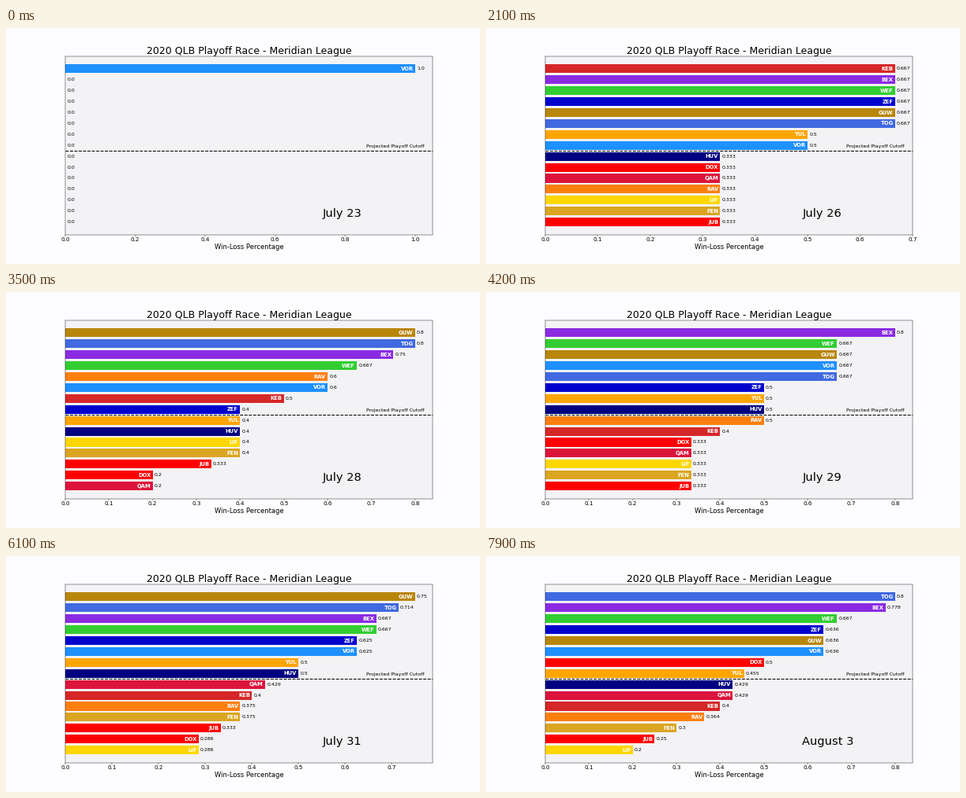
A matplotlib script that plays this animation: 600 px wide and 300 px high, repeating every 8 s.

```python
import matplotlib.pyplot as plt
from matplotlib.animation import FuncAnimation
from matplotlib.ticker import MultipleLocator

plt.rcParams["font.family"] = "DejaVu Sans"

FRAMES_PER_DAY = 7
FRAMES = 80

COLORS = {
    "VOR": "dodgerblue", "KEB": "tab:red", "GUW": "darkgoldenrod",
    "ZEF": "mediumblue", "HUV": "navy", "DOX": "red", "QAM": "crimson",
    "JUB": "red", "RAV": "tab:orange", "BEX": "blueviolet",
    "TOG": "royalblue", "WEF": "limegreen", "YUL": "orange",
    "LIF": "gold", "FEN": "goldenrod",
}

# Winners and losers of each day
RESULTS = [
    ("VOR", "YUL QAM"),
    ("RAV DOX WEF TOG KEB GUW VOR", "ZEF JUB HUV LIF FEN BEX YUL"),
    ("KEB GUW YUL ZEF HUV QAM JUB BEX", "VOR LIF FEN RAV DOX TOG WEF"),
    ("ZEF WEF TOG LIF BEX FEN YUL", "RAV DOX QAM JUB HUV KEB GUW VOR"),
    ("GUW TOG HUV RAV", "FEN DOX LIF ZEF QAM"),
    ("VOR BEX GUW TOG LIF FEN RAV", "YUL DOX HUV ZEF QAM KEB"),
    ("VOR BEX YUL DOX HUV ZEF QAM", "GUW TOG LIF FEN RAV KEB"),
    ("GUW VOR ZEF QAM", "YUL RAV FEN"),
    ("TOG GUW ZEF FEN YUL", "LIF BEX RAV VOR DOX"),
    ("TOG BEX ZEF VOR YUL", "LIF GUW RAV FEN"),
    ("TOG BEX ZEF VOR DOX DOX", "LIF GUW RAV FEN YUL"),
    ("TOG BEX RAV GUW DOX", "LIF YUL ZEF VOR HUV JUB"),
]

# Order of teams that are level, for the opening days and afterwards
OPENING = "VOR KEB GUW ZEF HUV DOX QAM JUB RAV BEX TOG WEF YUL LIF FEN".split()
LATER = "KEB BEX WEF ZEF GUW YUL HUV DOX QAM RAV VOR TOG LIF FEN JUB".split()


def build_standings():
    wins = dict.fromkeys(COLORS, 0)
    games = dict.fromkeys(COLORS, 0)
    table = []
    for day, (won, lost) in enumerate(RESULTS):
        for team in won.split():
            wins[team] += 1
            games[team] += 1
        for team in lost.split():
            games[team] += 1
        ties = OPENING if day < 3 else LATER
        pct = [(team, wins[team] / max(games[team], 1)) for team in ties]
        # sorted() is stable, so level teams keep the tie order
        table.append(sorted(pct, key=lambda row: -row[1]))
    return table


def date_text(day):
    number = 23 + day
    return f"July {number}" if number <= 31 else f"August {number - 31}"


STANDINGS = build_standings()

fig = plt.figure(figsize=(16, 8), dpi=37.5, facecolor="#fdfcfe")
ax = fig.add_axes([0.125, 0.125, 0.775, 0.755])


def draw(frame):
    day = frame // FRAMES_PER_DAY
    rows = STANDINGS[day]
    best = rows[0][1]
    gap = best / 200

    ax.clear()
    ax.set_facecolor("#f3f2f4")
    for i, (team, pct) in enumerate(rows):
        y = len(rows) - i
        ax.barh(y, pct, height=0.8, color=COLORS[team])
        if pct > 0:
            ax.text(pct - gap, y, team, size=13, weight="bold", color="white",
                    ha="right", va="center")
        ax.text(pct + gap, y, str(round(pct, 3)), size=12,
                ha="left", va="center")

    ax.axhline(7.5, color="black", lw=2, ls="--")
    ax.text(0.82, 0.49, "Projected Playoff Cutoff", size=12,
            transform=ax.transAxes)
    ax.text(0.7, 0.1, date_text(day), size=28, transform=ax.transAxes)

    ax.set_xlim(0, best * 1.05)
    ax.set_ylim(-0.14, 16.14)
    ax.xaxis.set_major_locator(MultipleLocator(0.2 if best > 0.9 else 0.1))
    ax.xaxis.set_major_formatter("{x:.1f}")
    ax.tick_params(axis="x", labelsize=14)
    ax.set_yticks([])
    ax.set_xlabel("Win-Loss Percentage", size=16)
    ax.set_title("2020 QLB Playoff Race - Meridian League", size=24)
    return []


anim = FuncAnimation(fig, draw, frames=FRAMES, interval=100,
                     init_func=lambda: draw(0), repeat=True, repeat_delay=0)
plt.show()
```
